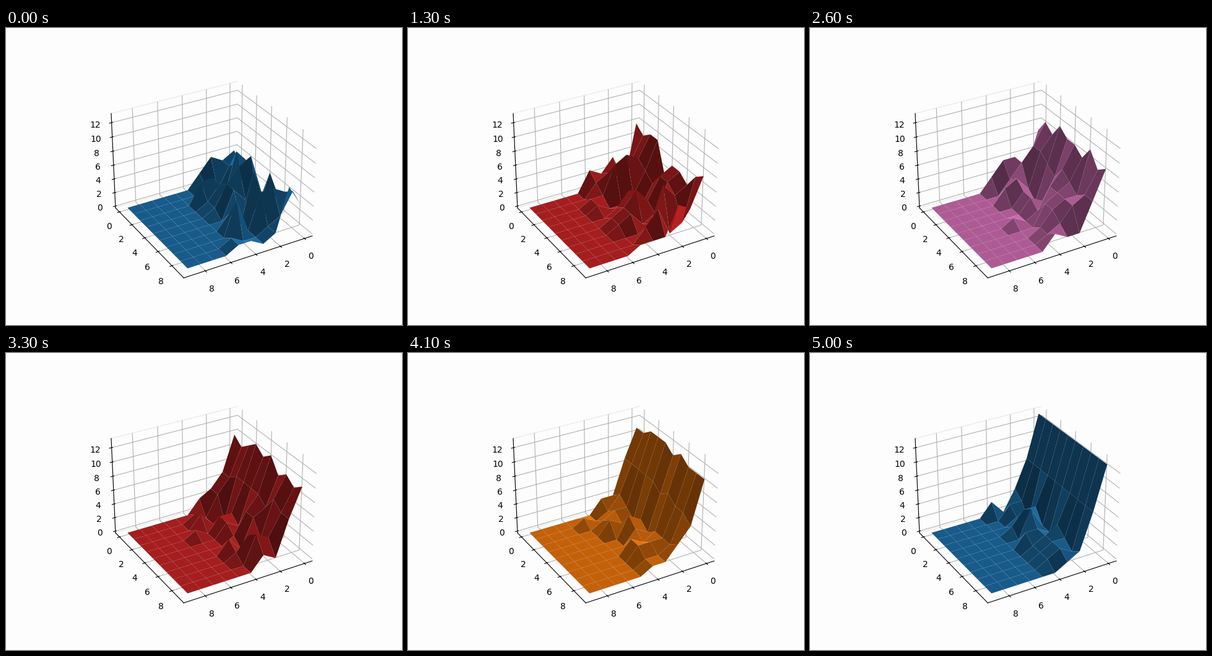
These frames come from a looping animation (640 px wide and 480 px high, 5.1 s). A matplotlib script:

```python
import numpy as np
import matplotlib.pyplot as plt
from matplotlib.animation import FuncAnimation

SIZE = 10
FRAMES = 51
STEP_MS = 100
TOP = 13
PAPER = "#fdfdfd"

X, Y = np.meshgrid(np.arange(SIZE), np.arange(SIZE))


def heights(step):
    """Whole-grain pile: a wall growing at x = 0 above a low, rough foot."""
    t = step / (FRAMES - 1)
    foot = 2.2 * np.exp(-(X / 4) ** 4)
    wall = (2 + 9 * t) * np.clip(1 - 0.55 * X, 0, 1)

    # The wall calms as it grows; the foot stays rough.
    rough = 0.3 + 0.6 * (X > 1) + 2 * (1 - t) ** 1.5
    noise = np.random.default_rng(step).normal(size=X.shape)
    z = foot + wall + noise * rough * np.minimum(1, foot)

    limit = np.floor(7 + 6.2 * t)
    return np.clip(np.round(z), 0, limit)


fig = plt.figure(figsize=(6.4, 4.8), dpi=100, facecolor=PAPER)
ax = fig.add_subplot(projection="3d")
ax.set_facecolor(PAPER)
ax.view_init(elev=30, azim=60)

edge = 0.45 + 9.9 / 48
ax.set_xlim(-edge, SIZE - 1 + edge)
ax.set_ylim(-edge, SIZE - 1 + edge)
ax.set_zlim(-TOP / 48, TOP + TOP / 48)

ax.xaxis.set_pane_color(PAPER)
ax.yaxis.set_pane_color(PAPER)
ax.yaxis.pane.set_edgecolor("#ebebeb")
ax.zaxis.set_pane_color((1, 1, 1, 0))

surface = None


def draw(step):
    global surface
    if surface is not None:
        surface.remove()
    surface = ax.plot_surface(X, Y, heights(step), color=f"C{step % 10}")
    return [surface]


anim = FuncAnimation(fig, draw, frames=FRAMES, interval=STEP_MS,
                     init_func=lambda: [], repeat=True, repeat_delay=0,
                     blit=False)
plt.show()
```
